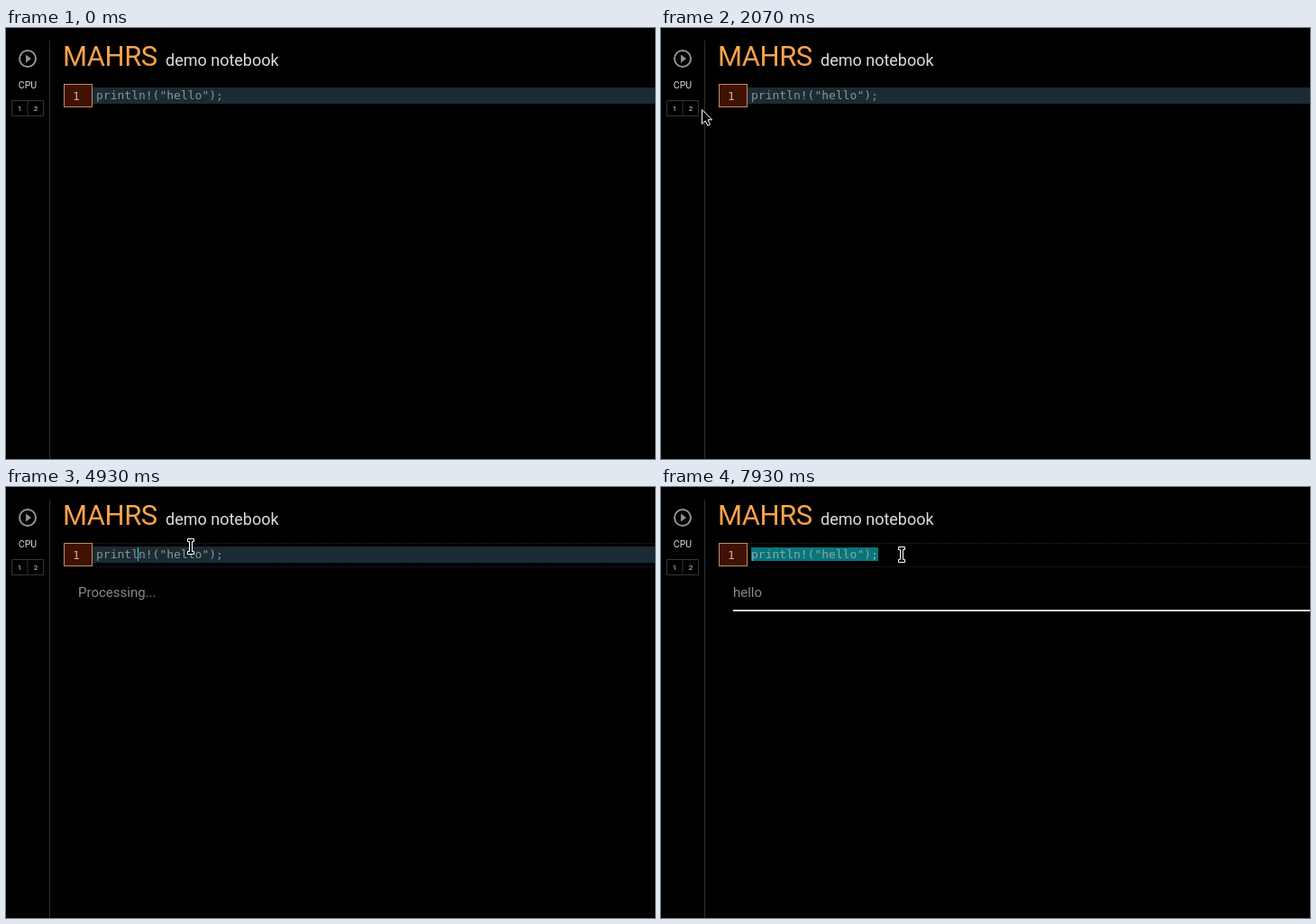
An HTML page for the animation above (8 s loop, 720x478 px).

```html
<!DOCTYPE html>
<html lang="en">
<head>
<meta charset="utf-8">
<title>Notebook demo</title>
<style>
  html, body { margin: 0; width: 100%; height: 100%; overflow: hidden; background: #000; }
  svg { display: block; width: 720px; height: 478px; }
  text { font-family: Roboto, "Open Sans", sans-serif; fill: #dcdcdc; white-space: pre; }
  .mono { font: 13px "DejaVu Sans Mono", monospace; }
  .title { font-size: 31px; letter-spacing: -.5px; fill: url(#amber); }
  .output { font-size: 15px; fill: #8a8a8a; }
  .code { fill: #8c9292; }
  .selected .code { fill: #8fa8a8; }

  .anim, .pointer, .pointer > * { animation: 8s step-end infinite; }
  .button { animation-name: button; }
  .highlight { animation-name: highlight; }
  .selected { animation-name: selected; }
  .divider { animation-name: divider; }
  .processing { animation-name: processing; }
  .result { animation-name: result; }
  .caret { animation-name: caret; }
  .pointer { animation-name: travel; }
  .pointer > .arrow { animation-name: arrow; }
  .pointer > .hand { animation-name: hand; }
  .pointer > .beam { animation-name: beam; }

  /* 1% of the loop is 80 ms */
  @keyframes button { 0% { color: #929292; } 27.5% { color: #e8e8e8; } 35.8%, 100% { color: #929292; } }
  @keyframes highlight { 0% { visibility: visible; } 98.3%, 100% { visibility: hidden; } }
  @keyframes selected { 0% { visibility: hidden; } 98.3%, 100% { visibility: visible; } }
  @keyframes divider { 0% { visibility: hidden; } 41.6%, 100% { visibility: visible; } }
  @keyframes processing { 0% { visibility: hidden; } 51.6% { visibility: visible; } 76.6%, 100% { visibility: hidden; } }
  @keyframes result { 0% { visibility: hidden; } 76.6%, 100% { visibility: visible; } }
  @keyframes caret {
    0%, 66.6%, 81.6% { visibility: hidden; transform: none; }
    41.6%, 74.1%, 89.1% { visibility: visible; transform: none; }
    90.8% { visibility: visible; transform: translateX(95px); }
    98.3%, 100% { visibility: hidden; transform: none; }
  }
  @keyframes arrow { 0% { visibility: visible; } 27.5% { visibility: hidden; } 36.6% { visibility: visible; } 38.3%, 100% { visibility: hidden; } }
  @keyframes hand { 0% { visibility: hidden; } 27.5% { visibility: visible; } 36.6%, 100% { visibility: hidden; } }
  @keyframes beam { 0% { visibility: hidden; } 38.3%, 100% { visibility: visible; } }
  @keyframes travel {
    0% { transform: translate(267px, 500px); }
    3.3% { transform: translate(267px, 452px); }
    4.1% { transform: translate(262px, 340px); }
    5% { transform: translate(250px, 255px); }
    5.8% { transform: translate(244px, 235px); }
    11.6% { transform: translate(238px, 229px); }
    12.5% { transform: translate(222px, 212px); }
    13.3% { transform: translate(200px, 188px); }
    14.1% { transform: translate(176px, 168px); }
    15% { transform: translate(155px, 155px); }
    15.8% { transform: translate(130px, 148px); }
    16.6% { transform: translate(105px, 145px); }
    17.5% { transform: translate(82px, 144px); }
    18.3% { transform: translate(66px, 144px); }
    19.1% { transform: translate(58px, 144px); }
    25% { transform: translate(55px, 128px); }
    25.8% { transform: translate(45px, 90px); }
    26.6% { transform: translate(35px, 55px); }
    27.5% { transform: translate(28px, 30px); }
    28.3% { transform: translate(25px, 20px); }
    35.8% { transform: translate(34px, 31px); }
    36.6% { transform: translate(64px, 48px); }
    37.5% { transform: translate(98px, 62px); }
    38.3% { transform: translate(130px, 72px); }
    39.1% { transform: translate(151px, 78px); }
    41.6% { transform: translate(149px, 77px); }
    42.5% { transform: translate(147px, 76px); }
    43.3% { transform: translate(146px, 75px); }
    59.1% { transform: translate(118px, 78px); }
    60% { transform: translate(106px, 74px); }
    60.8% { transform: translate(150px, 67px); }
    61.6% { transform: translate(205px, 66px); }
    62.5% { transform: translate(250px, 68px); }
    63.3% { transform: translate(265px, 71px); }
    80% { transform: translate(266px, 73px); }
    81.6% { transform: translate(266px, 75px); }
    83.3% { transform: translate(268px, 78px); }
    84.1% { transform: translate(267px, 76px); }
    87.5% { transform: translate(266px, 75px); }
    89.1%, 100% { transform: translate(267px, 75px); }
  }
</style>
</head>
<body>
<svg viewBox="0 0 720 478">
  <defs>
    <linearGradient id="amber" x2="0" y2="1">
      <stop stop-color="#ffae50"/>
      <stop offset="1" stop-color="#f49444"/>
    </linearGradient>
  </defs>

  <g class="sidebar">
    <path d="M48.5 14V478" stroke="#303030"/>
    <g class="anim button">
      <circle cx="24" cy="34" r="9" fill="none" stroke="currentColor" stroke-width="2"/>
      <path d="M22 29.5L28 34L22 38.5Z" fill="currentColor"/>
    </g>
    <text x="24" y="67" font-size="10.5" text-anchor="middle">CPU</text>
    <path d="M6.5 80.5H41.5V97.5H6.5ZM24 80V98" fill="none" stroke="#343434"/>
    <text x="15" y="92" font-size="8" text-anchor="middle">1</text>
    <text x="33" y="92" font-size="8" text-anchor="middle">2</text>
  </g>

  <text class="title" x="63" y="42">MAHRS</text>
  <text x="177" y="42" font-size="18">demo notebook</text>

  <g class="cell">
    <rect class="anim highlight" x="96" y="66" width="624" height="18" fill="#1b2b34"/>
    <path class="anim divider" d="M96 62.5H719M96 88.5H719" stroke="#262626" stroke-dasharray="1 1"/>
    <rect x="64.5" y="62.5" width="31" height="25" fill="#401206" stroke="#c48c60"/>
    <text class="mono" x="78" y="80" text-anchor="middle" style="fill:#dca878">1</text>
    <text class="mono code" x="100" y="79">println!("hello");</text>
    <g class="anim selected">
      <rect x="100" y="67" width="141" height="15" fill="#08757a"/>
      <text class="mono code" x="100" y="79">println!("hello");</text>
    </g>
    <rect class="anim caret" x="146" y="67" width="1" height="15" fill="#30d0b8"/>
  </g>

  <text class="output anim processing" x="80" y="122">Processing...</text>
  <g class="anim result">
    <text class="output" x="80" y="122">hello</text>
    <rect x="80" y="136" width="640" height="2" fill="#d8d8d8"/>
  </g>

  <g class="pointer" fill="#000" stroke="#fff">
    <path class="arrow" d="M.5.5V16.5L4.2 13L6.8 18.2L9.4 17L7 11.8H11.6Z"/>
    <path class="hand" d="M-1.5 10V1Q0-1 1.5 1V7Q3 5.5 4.5 7.5Q6 6.2 7.5 8Q9.5 7 10 9V14L8 18H0L-5 11.5Q-4.5 8.5-1.5 11Z"/>
    <path class="beam" d="M-3.5-8.5H3.5V-5.5H1.5V5.5H3.5V8.5H-3.5V5.5H-1.5V-5.5H-3.5Z"/>
  </g>
</svg>
</body>
</html>
```
